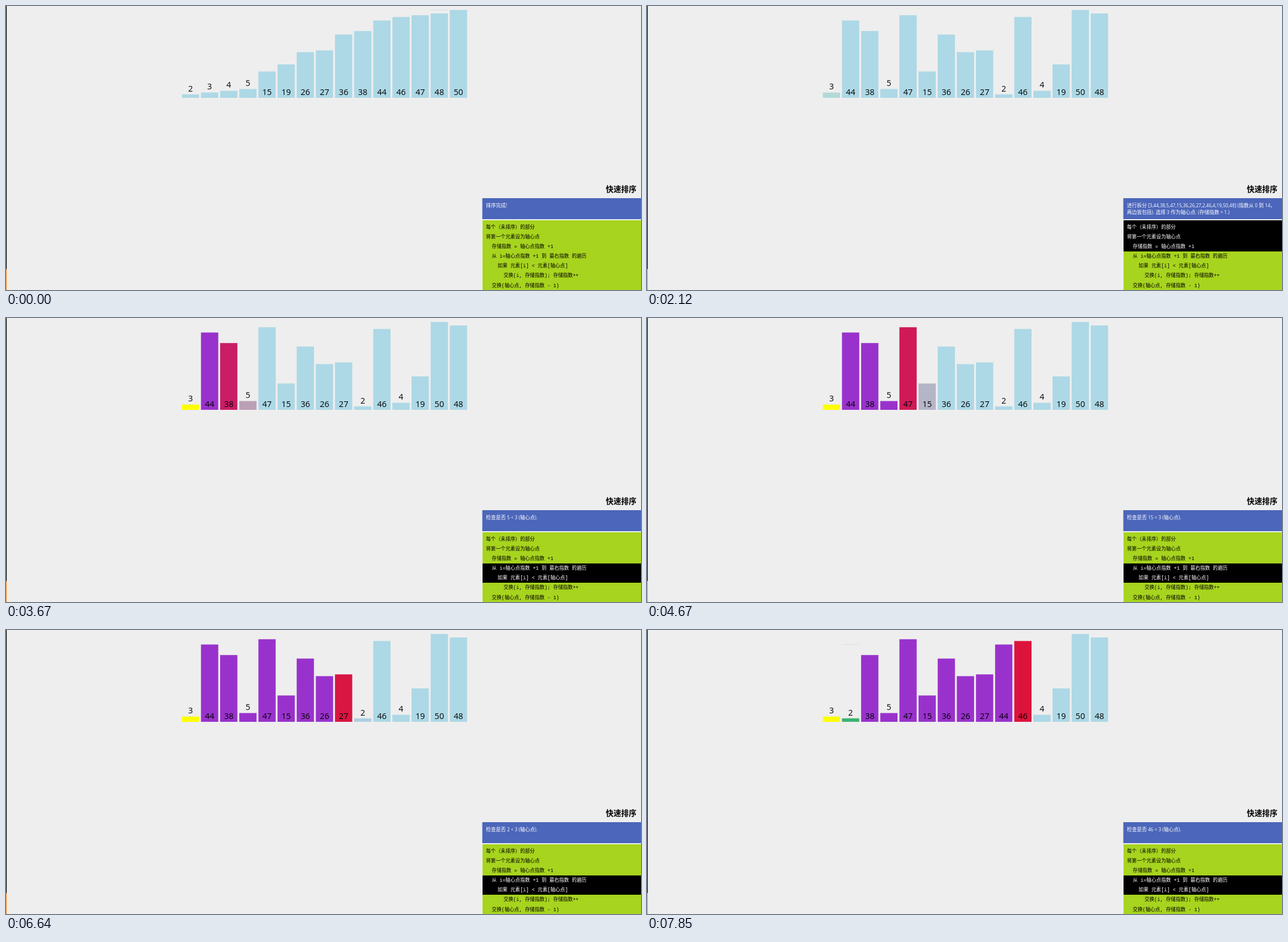
An HTML page that plays this animation: 1118x501 px, repeating every 8 s.

```html
<!DOCTYPE html>
<html lang="zh-CN">
<head>
<meta charset="utf-8">
<title>快速排序</title>
<style>
  html, body { margin: 0; width: 100%; height: 100%; overflow: hidden; background: #eee; }
  svg { display: block; }
  text { white-space: pre; }
  .bar text { font: 14.5px "Open Sans", "Noto Sans", sans-serif; text-anchor: middle; }
  .title { font: bold 13.5px "Noto Sans CJK SC", "Noto Sans CJK", sans-serif; text-anchor: end; }
  .status { font: 500 8.2px "Open Sans", "Noto Sans CJK SC", "Noto Sans CJK", sans-serif; fill: #fff; }
  .status .han { font-size: 8.75px; }
  .code { font: 8.6px "Liberation Mono", "Noto Sans CJK SC", "Noto Sans CJK", monospace; }
</style>
</head>
<body>
<svg width="1118" height="501" viewBox="0 0 1118 501">
  <rect width="1.2" height="464"/>
  <rect y="464" width="1.2" height="37" fill="#ff8a27"/>
  <g id="bars"></g>
  <text class="title" x="1110" y="328">快速排序</text>
  <rect x="838.6" y="339" width="280" height="37" fill="#4b66ba"/>
  <text class="status" x="845" y="355.2"></text>
  <text class="status" x="845" y="367.2"></text>
  <g id="code"></g>
</svg>
<script>
const LOOP = 8000, MOVE = 250, TICK = 62;
const BASE = 162, UNIT = 3.1, SLOT = 33.7, LEFT = 309.6, WIDTH = 30.4;
const BLUE = [173, 216, 230], YELLOW = [255, 255, 0], RED = [220, 20, 60],
      PURPLE = [153, 50, 204], GREEN = [60, 179, 113];

const list = [3, 44, 38, 5, 47, 15, 36, 26, 27, 2, 46, 4, 19, 50, 48];
const sorted = [...list].sort((a, b) => a - b);
const swapped = [...list];
[swapped[1], swapped[9]] = [list[9], list[1]];

const codeLines = [
  [0, '每个（未排序）的部分'],
  [0, '将第一个元素设为轴心点'],
  [1, '存储指数 = 轴心点指数 +1'],
  [1, '从 i=轴心点指数 +1 到 最右指数 的遍历'],
  [2, '如果 元素[i] < 元素[轴心点]'],
  [3, '交换(i, 存储指数); 存储指数++'],
  [1, '交换(轴心点, 存储指数 - 1)']
];

// Each step: bar order, colour by slot, status text, highlighted code lines
const plain = () => BLUE;
const check = (order, i, left = 0) => ({
  order, lines: [3, 4],
  text: [`检查是否 ${order[i]} < 3 (轴心点).`],
  paint: j => j === 0 ? YELLOW : j <= left ? GREEN : j < i ? PURPLE : j === i ? RED : BLUE
});
const steps = [
  { order: sorted, paint: plain, text: ['排序完成!'], lines: [], trace: [13, 50] },
  { order: list, paint: plain, text: [], lines: [] },
  {
    order: list, lines: [0, 1, 2],
    paint: j => j ? BLUE : YELLOW,
    text: [`进行拆分 [${list}] (指数从 0 到 14，`, '两边皆包括). 选择 3 作为轴心点. (存储指数 = 1.)']
  },
  ...[1, 2, 3, 4, 5, 6, 7, 8, 9].map(i => check(list, i)),
  {
    order: swapped, lines: [3, 5], trace: [1, 44],
    paint: j => j === 0 ? YELLOW : j === 1 ? RED : j < 10 ? PURPLE : BLUE,
    text: ['将指数 9 (数值 = 2) 和在存储指数 1 (数值 = 44) 的', '元素交换. (交换后的存储指数数值 = 2).']
  },
  { ...check(swapped, 10, 1), trace: [1, 44] }
];
const shown = [0, 1060, 2120, 2600, 3060, 3610, 4070, 4600, 5070, 5610, 6090, 6640, 7110, 7650];
const begin = i => i < 2 ? 1050 : 2060 + 502.7 * (i - 2);

const $ = q => document.querySelector(q);
function add(parent, tag, attrs, text = '') {
  const el = document.createElementNS('http://www.w3.org/2000/svg', tag);
  for (const key in attrs) el.setAttribute(key, attrs[key]);
  el.textContent = text;
  return parent.appendChild(el);
}

const trace = add($('#bars'), 'rect', { width: WIDTH, height: 0.8, fill: '#cfdce0' });
const bars = list.map(v => {
  const g = add($('#bars'), 'g', { class: 'bar' }), top = BASE - v * UNIT;
  const rect = add(g, 'rect', { y: top, width: WIDTH, height: v * UNIT });
  add(g, 'text', { x: WIDTH / 2, y: v < 10 ? top - 5.3 : BASE - 5.4 }, v);
  return { v, g, rect };
});

const rows = codeLines.map(([indent, text], i) => {
  const y = 381.1 + 17.15 * i, top = i ? y : 377.6;
  const rect = add($('#code'), 'rect', {
    x: 838.6, y: top, width: 280, height: y + 17.15 - top, 'shape-rendering': 'crispEdges'
  });
  const label = add($('#code'), 'text', { class: 'code', x: 845 + 10.3 * indent, y: y + 11.6 }, text);
  return { rect, label };
});

const status = document.querySelectorAll('.status');
const mix = (a, b, p) => a + (b - a) * p;
const ease = p => p < 0.5 ? 4 * p ** 3 : 1 - 4 * (1 - p) ** 3;
let current = -1;

function showStep(i) {
  const { text, lines, trace: mark } = steps[i];
  status.forEach((el, n) => {
    el.textContent = '';
    for (const run of (text[n] || '').match(/[\x00-\x7f]+|[^\x00-\x7f]+/g) || [])
      add(el, 'tspan', { class: run > '\x7f' ? 'han' : 'latin' }, run);
  });
  rows.forEach(({ rect, label }, n) => {
    const on = lines.includes(n);
    rect.setAttribute('fill', on ? '#000' : '#a7d41e');
    label.setAttribute('fill', on ? '#fff' : '#000');
  });
  trace.setAttribute('visibility', mark ? 'visible' : 'hidden');
  if (mark) {
    trace.setAttribute('x', LEFT + SLOT * mark[0] - 0.6 + 0.9);
    trace.setAttribute('y', BASE - UNIT * mark[1] - 0.4);
  }
}

function draw(now) {
  const t = now % LOOP;
  const i = shown.findLastIndex(s => t >= s);
  if (i !== current) showStep(current = i);
  const step = steps[i], prev = steps[Math.max(0, i - 1)];
  // Transitions advance in coarse ticks
  const tick = shown[i] + Math.floor((t - shown[i] + 2) / TICK) * TICK;
  const p = ease(Math.min(1, Math.max(0, (tick - begin(i)) / MOVE)));
  for (const { v, g, rect } of bars) {
    const a = prev.order.indexOf(v), b = step.order.indexOf(v);
    const from = prev.paint(a), to = step.paint(b);
    g.setAttribute('transform', `translate(${LEFT + SLOT * mix(a, b, p)})`);
    rect.setAttribute('fill', `rgb(${from.map((c, n) => Math.round(mix(c, to[n], p)))})`);
  }
}

const start = performance.now();
function loop() {
  draw(performance.now() - start);
  requestAnimationFrame(loop);
}
loop();
</script>
</body>
</html>
```
